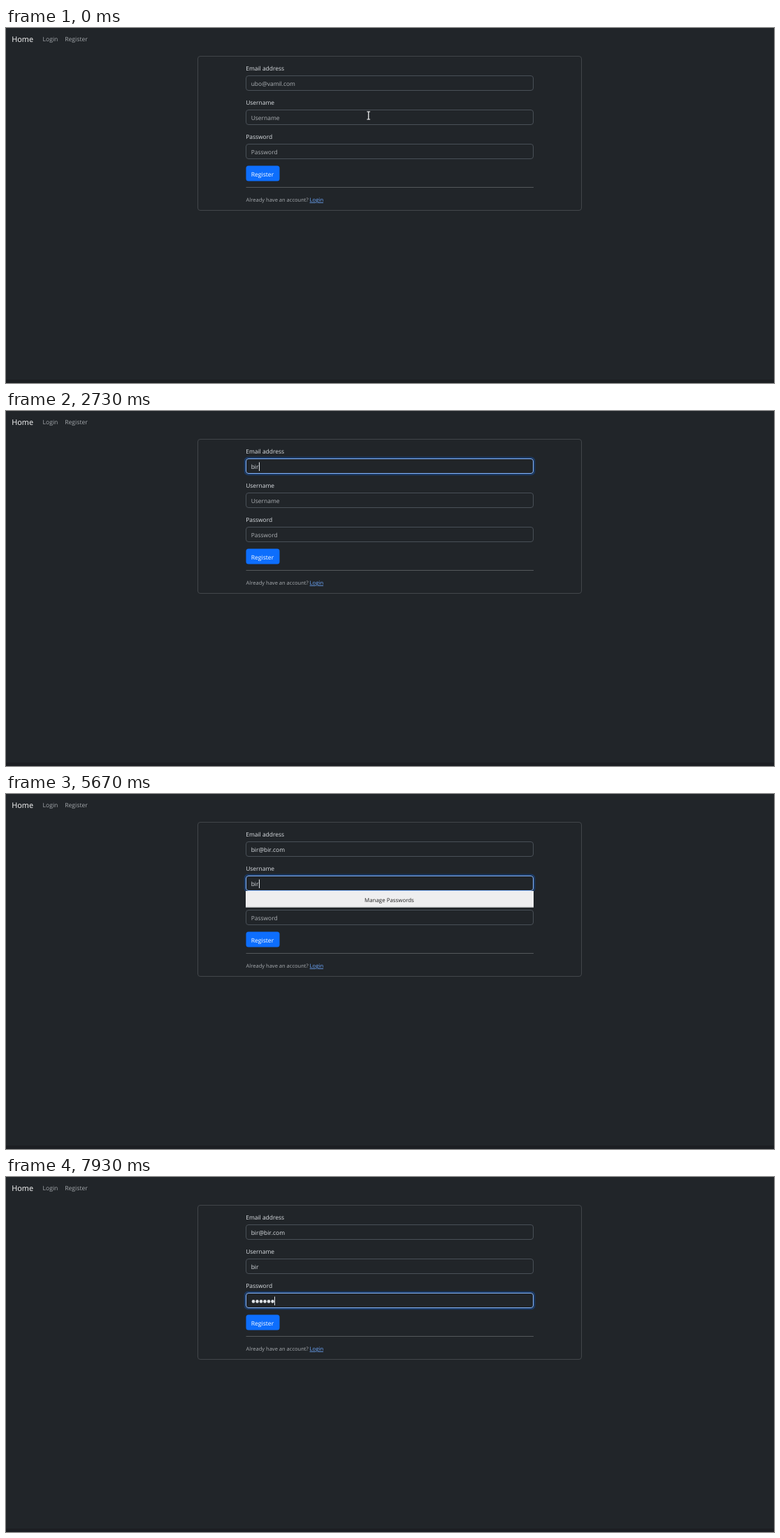
An HTML page that plays this animation: 1099 px wide and 509 px high, repeating every 8 s.

```html
<!DOCTYPE html>
<html lang="en">
<head>
<meta charset="utf-8">
<title>Register form</title>
<style>
  html, body { margin: 0; width: 100%; height: 100%; overflow: hidden; background: #212529; }
  svg { display: block; width: 100%; height: 100%; }
  text { font: 8.45px "Open Sans", "Noto Sans", sans-serif; fill: #dee2e6; text-rendering: geometricPrecision; }
  .brand { font-size: 10.9px; fill: #fff; }
  .nav { font-size: 8.65px; fill: #a4a8ac; }
  .hint { fill: #aeb2b6; }
  .small { font-size: 7.55px; fill: #a7abaf; }
  .link { font-size: 7.7px; fill: #6ea8fe; text-decoration: underline; }
  .button { font-size: 8.6px; fill: #fff; }
  .menu { font-size: 7.9px; fill: #212121; text-anchor: middle; }
</style>
</head>
<body>
<svg id="stage" viewBox="0 0 1099 509">
  <rect width="1099" height="509" fill="#212529"/>
  <rect y="504" width="1099" height="5" fill="#1c1f23"/>
  <text class="brand" x="8.2" y="20">Home</text>
  <text class="nav" x="52.5" y="19">Login</text>
  <text class="nav" x="84.2" y="19">Register</text>
  <rect x="274.5" y="40.5" width="549" height="221" rx="3.5" fill="none" stroke="#42464a"/>
  <g id="fields"></g>
  <rect x="343.5" y="197.5" width="48" height="22" rx="3.5" fill="#0d6efd"/>
  <text class="button" x="350.7" y="212.5">Register</text>
  <path d="M343.5 228.5H755" stroke="#54585b"/>
  <text class="small" x="343.6" y="249">Already have an account?</text>
  <text class="link" x="434.6" y="249">Login</text>
  <g id="menu">
    <rect x="343" y="139" width="412" height="23.5" fill="#eeeeef"/>
    <path d="M343 162H755" stroke="#cfd1d3"/>
    <text class="menu" x="548.5" y="154.5">Manage Passwords</text>
  </g>
  <rect id="caret" width="1" height="12.5" fill="#dee2e6"/>
  <path id="mouse" d="M-2.3-5.5H2.3M-2.3 5.5H2.3M0-5.5V5.5" fill="none" stroke="#fff" stroke-width="1.2"/>
</svg>
<script>
const LOOP = 8000, TICK = 200 / 3, LEFT = 350.7, DOT = 5.5;
const byId = id => document.getElementById(id);
const fieldLayer = byId('fields'), menu = byId('menu'), caret = byId('caret'), mouse = byId('mouse');

function add(tag, attrs, text = '') {
  const el = document.createElementNS('http://www.w3.org/2000/svg', tag);
  for (const key in attrs) el.setAttribute(key, attrs[key]);
  el.textContent = text;
  fieldLayer.append(el);
  return el;
}

// keys: the moment each character of the value appears
const fields = [
  { label: 'Email address', hint: 'ubo@vamil.com', value: 'bir@bir.com', y: 68, focus: 1330, blur: 4800,
    keys: [2533, 2600, 2733, 3400, 3733, 3867, 3933, 4067, 4200, 4267, 4400] },
  { label: 'Username', hint: 'Username', value: 'bir', y: 117, focus: 4800, blur: 6000,
    keys: [5467, 5533, 5667] },
  { label: 'Password', hint: 'Password', secret: true, y: 166, focus: 6000, blur: 9000,
    keys: [7067, 7200, 7400, 7733, 7867, 7933] }
];
const caretOff = [[1930, 2467], [6733, 7067]];

for (const f of fields) {
  add('text', { x: 343.2, y: f.y - 7 }, f.label);
  f.ring = add('rect', { x: 341.85, y: f.y - 1.15, width: 414.3, height: 24.3, rx: 4.6,
    fill: 'none', stroke: '#0d6efd', 'stroke-width': 2.3 });
  f.box = add('rect', { x: 343.5, y: f.y + .5, width: 411, height: 21, rx: 3.5, fill: '#212529' });
  f.hintText = add('text', { class: 'hint', x: LEFT, y: f.y + 15 }, f.hint);
  f.text = add('text', { x: LEFT, y: f.y + 15 });
  f.dots = f.secret ? f.keys.map((_, i) =>
    add('circle', { cx: 354 + i * DOT, cy: f.y + 12.4, r: 2.3, fill: '#dee2e6' })) : [];
}

const clamp = v => Math.min(1, Math.max(0, v));
const smooth = v => v * v * (3 - 2 * v);
const mix = (a, b, p) => a + (b - a) * p;
const show = (el, on) => el.setAttribute('visibility', on ? 'visible' : 'hidden');
const fade = (t, at) => smooth(clamp((t - at + 50) / 150)) * (t >= at);

function drawField(f, t) {
  const glow = fade(t, f.focus) - fade(t, f.blur);
  const typed = f.keys.filter(at => t >= at).length;
  const rgb = [[73, 134], [80, 183], [87, 254]].map(([a, b]) => Math.round(mix(a, b, glow)));
  f.box.setAttribute('stroke', `rgb(${rgb})`);
  f.ring.setAttribute('opacity', glow * .27);
  show(f.hintText, !typed);
  if (f.secret) f.dots.forEach((dot, i) => show(dot, i < typed));
  else f.text.textContent = f.value.slice(0, typed);

  if (t >= f.focus && t < f.blur) {
    const width = f.secret ? typed * DOT : typed ? f.text.getComputedTextLength() : 0;
    caret.setAttribute('x', Math.round(351 + width));
    caret.setAttribute('y', f.y + 5.5);
  }
}

function draw(ms) {
  const tick = Math.floor((ms + 4) / TICK);
  const t = tick * TICK + 4;
  fields.forEach(f => drawField(f, t));
  show(caret, t >= fields[0].focus && !caretOff.some(([a, b]) => t >= a && t < b));
  show(menu, t >= 4867 && t < 6000);
  const p = smooth(clamp(tick / 11));
  mouse.setAttribute('transform', `translate(${mix(518.8, 392.5, p)} ${mix(125.5, 81, p)})`);
  show(mouse, t < 2533);
}

const start = performance.now();
function loop() {
  draw((performance.now() - start) % LOOP);
  requestAnimationFrame(loop);
}
loop();
</script>
</body>
</html>
```
